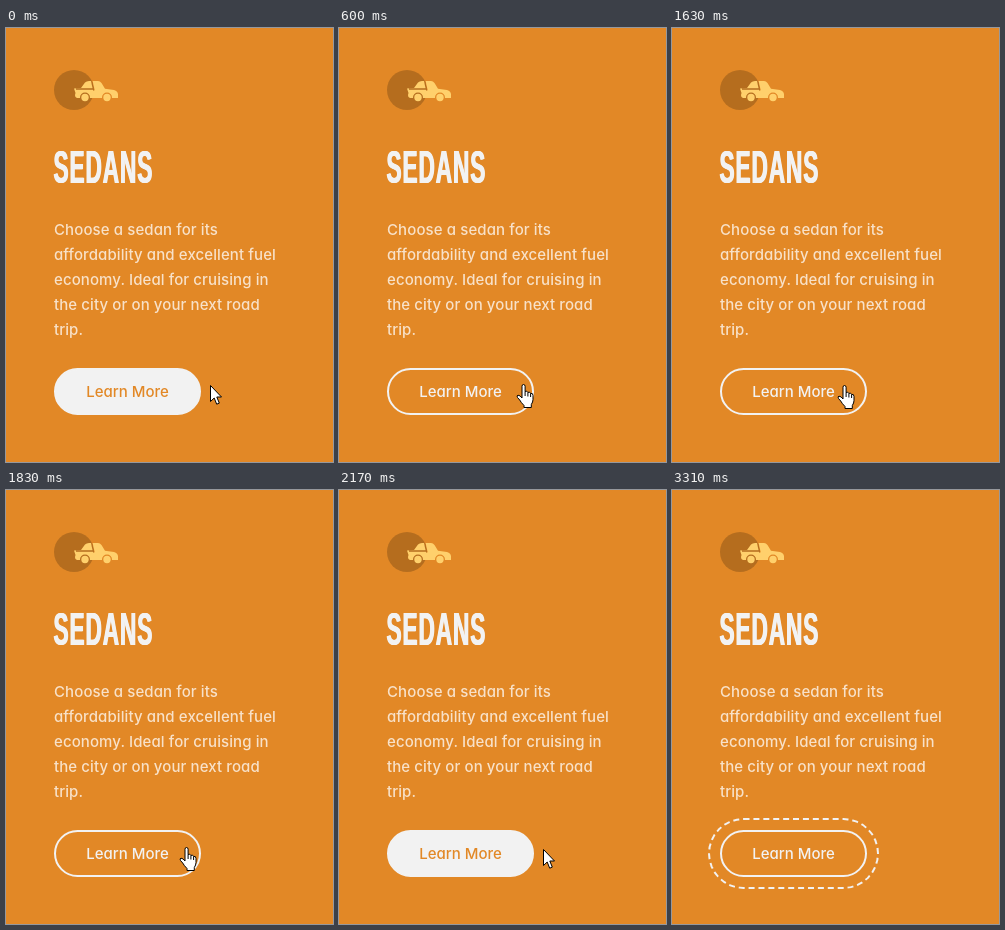
Write an HTML page that moves like this. It is 327x434 px and loops after 4.79 s.

```html
<!DOCTYPE html>
<html lang="en">
<head>
<meta charset="utf-8">
<title>Sedans</title>
<style>
  html, body { margin: 0; width: 100%; height: 100%; overflow: hidden; }
  body {
    background: #e28826;
    font: 500 15px Inter, "Open Sans", sans-serif;
    font-feature-settings: "cv11";
  }
  body > * { position: absolute; margin: 0; white-space: nowrap; }
  #icon { left: 48px; top: 42px; }
  h1 {
    left: 47px; top: 119px;
    font: 700 47px/40px "Liberation Sans", Arial, sans-serif;
    letter-spacing: 2px;
    color: #f2f2f2;
    text-shadow: 1px 0, 2px 0;
    transform: scaleX(.48);
    transform-origin: 0 0;
  }
  p {
    left: 48px; top: 189px;
    line-height: 25px;
    letter-spacing: .1px;
    color: rgba(255, 255, 255, .75);
  }
  #more {
    left: 48px; top: 340px; width: 147px; height: 47px;
    box-sizing: border-box;
    border: 2px solid #f2f2f2;
    border-radius: 24px;
    background: #f2f2f2;
    color: #e28826;
    line-height: 43px;
    text-align: center;
  }
  #more.hover { background: none; color: #f2f2f2; }
  #more.focus { outline: 2px dashed #f2f2f2; outline-offset: 10px; }
  #cursor { left: 0; top: 0; overflow: visible; }
</style>
</head>
<body>
<svg id="icon" width="64" height="40">
  <mask id="gaps">
    <rect width="64" height="40" fill="#fff"/>
    <path d="M37.500 9Q38.500 15 40 20.500M22 19H39.500" fill="none" stroke="#000" stroke-width="1.6"/>
    <circle cx="31" cy="27.5" r="5"/>
    <circle cx="53" cy="27.5" r="5"/>
  </mask>
  <circle cx="20" cy="20" r="20" opacity=".2"/>
  <g fill="#ffd06c">
    <path mask="url(#gaps)" d="M20 18.5L27 18 31 12.500Q32.500 11 35 11H44Q46 11 47.500 13L51 18.800 60 20Q64 21 64 24.500V28H23Q20 27 21.500 23Z"/>
    <circle cx="31" cy="27.5" r="3.7"/>
    <circle cx="53" cy="27.5" r="3.7"/>
  </g>
</svg>
<h1>SEDANS</h1>
<p>Choose a sedan for its<br>affordability and excellent fuel<br>economy. Ideal for cruising in<br>the city or on your next road<br>trip.</p>
<div id="more">Learn More</div>
<svg id="cursor" width="1" height="1" fill="#fff" stroke="#000" stroke-linejoin="round">
  <path id="arrow" d="M.5.5V16.500L4.200 13 6.700 19.200 9.300 18.100 6.800 12H11.500Z"/>
  <g id="hand" transform="translate(-6.5 -1)">
    <path d="M5.500 2.200Q5.500.500 7 .500T8.600 2.200V7.500Q10.500 6.400 11.400 8.400 13.300 7.400 14.100 9.400 16.500 8.800 16.500 11.500V15.500Q16.500 18 14.800 20.500V23.500H7.500V21.500Q4.500 18.500 3.200 16L1 13.500Q-.2 11.500 1.500 11.200 3.500 11.200 5.500 14Z"/>
    <path d="M8.600 7.500V12M11.400 8.400V12.500M14.100 9.400V13" fill="none"/>
  </g>
</svg>
<script>
const LOOP = 4790, FOCUS = 3310;
const $ = id => document.getElementById(id);

// Each move: start, step length, y from and to, x after each step
const moves = [
  [0, 270, 357, 357, [204]],
  [270, 67.1, 357, 357, [203, 201, 198, 193, 188, 184, 179, 174]],
  [810, 70, 358, 358, [172, 170]],
  [1630, 67.1, 358, 359, [172, 174, 177, 180, 184, 189, 194, 199]],
  [2170, 70, 359, 359, [204, 210, 216, 221, 225, 227]]
];

function pointer(t) {
  const [start, step, y0, y1, xs] = moves.filter(m => m[0] <= t).pop();
  const last = xs.length - 1;
  const k = Math.min(last, Math.floor((t - start + 8) / step));
  return [xs[k], Math.round(y0 + (y1 - y0) * k / (last || 1))];
}

function show(id, on) {
  $(id).style.display = on ? "" : "none";
}

function draw(now) {
  const t = now % LOOP;
  const [x, y] = pointer(t);
  const focus = t >= FOCUS;
  const over = x < 195;
  $("more").classList.toggle("hover", over || focus);
  $("more").classList.toggle("focus", focus);
  $("cursor").style.transform = `translate(${x}px, ${y}px)`;
  show("cursor", !focus);
  show("hand", over);
  show("arrow", !over);
}

const begin = performance.now();
function tick() {
  draw(performance.now() - begin);
  requestAnimationFrame(tick);
}
tick();
</script>
</body>
</html>
```
